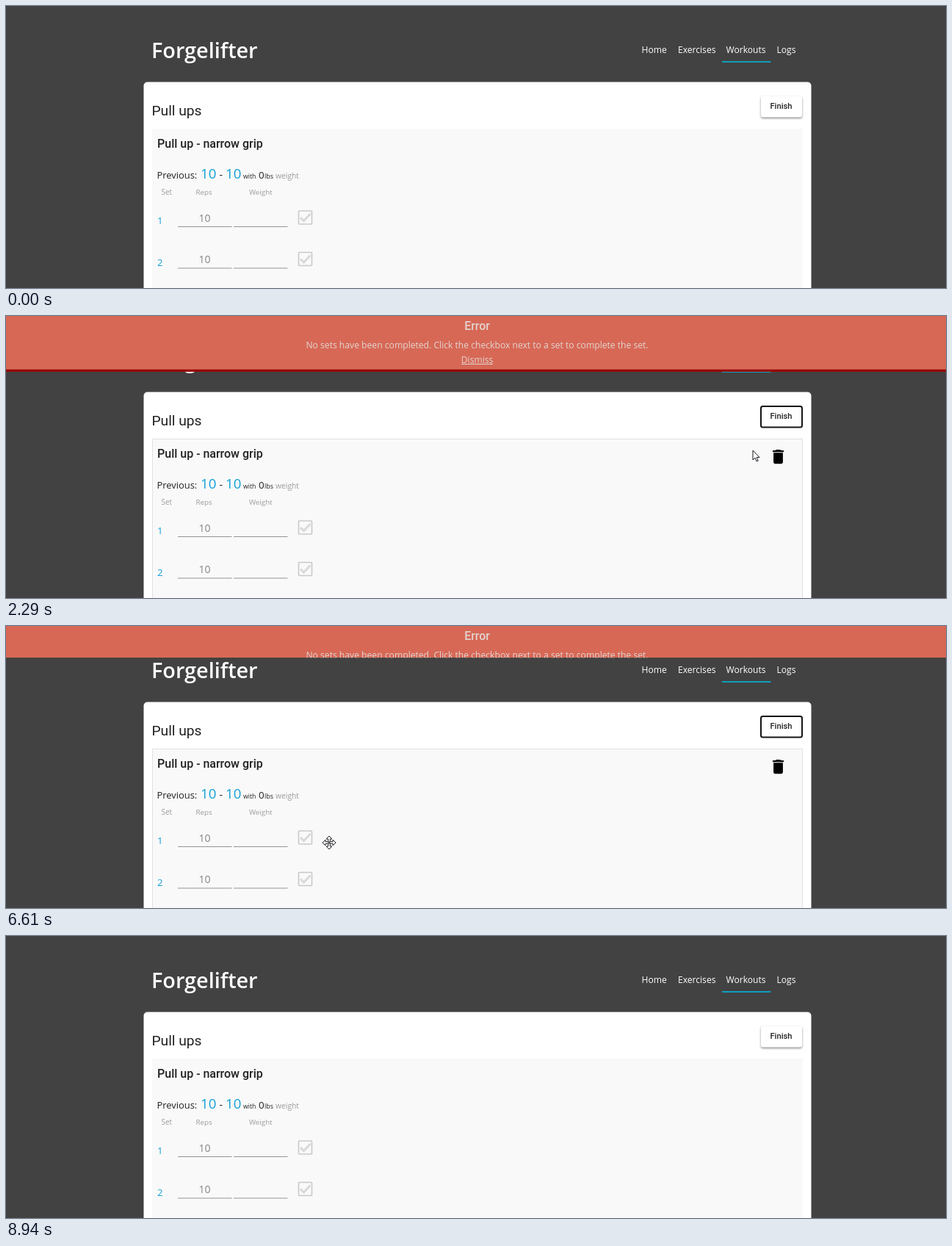
Animation, 1280 px wide and 384 px high, one loop 9.02 s. Source, as an HTML page with a canvas:

```html
<!DOCTYPE html>
<html lang="en">
<head>
<meta charset="utf-8">
<title>Workout log</title>
<style>
  html, body { margin: 0; width: 100%; height: 100%; overflow: hidden; background: #424242; }
  canvas { display: block; }
</style>
</head>
<body>
<canvas id="stage" width="1280" height="384"></canvas>
<script>
const ctx = document.getElementById('stage').getContext('2d');
const LOOP = 9020;
const SANS = '"Open Sans", "Noto Sans", sans-serif';
const ROBOTO = 'Roboto, sans-serif';
const BLUE = '#139fd7', GRAY = '#9b9b9b', INK = '#212121';

// Pointer visits: each list holds [time, x, y] points; it is hidden between lists.
const VISITS = [
  [[70, 1176, 236], [240, 1072, 212], [400, 1064, 160], [540, 1064, 131],
   [700, 1063, 148], [940, 1063, 147], [1100, 1063, 143.5], [1500, 1063, 143.5],
   [1740, 1066, 168], [1900, 1066, 176], [2130, 1032, 182], [2290, 1017, 183],
   [2520, 1014, 183], [2760, 998, 183], [3800, 998, 183], [3850, 996, 186],
   [4010, 950, 205], [4250, 520, 325], [4400, 381, 382], [4460, 381, 400]],
  [[4560, 373, 380], [4800, 392, 330], [5040, 412, 293], [5350, 413, 293],
   [5600, 436, 295], [5750, 440, 295], [7220, 440, 295], [7460, 860, 260],
   [7620, 1080, 230], [7700, 1205, 205], [7780, 1206, 205]]
];

const DELETE_ICON = new Path2D('M6 19c0 1.1.9 2 2 2h8c1.1 0 2-.9 2-2V7H6v12zM19 4h-3.5l-1-1h-5l-1 1H5v2h14V4z');
const ARROW = new Path2D('M0 0V13L3 10.2L5.2 15L7.2 14.1L5.1 9.5H9Z');
const HAND = new Path2D('M-1.4 1.2Q0-1 1.4 1.2V6Q3 4.8 4 6.4Q5.6 5.6 6.3 7.2Q8.2 6.8 8.2 9V12Q7.6 14.5 6.4 17.5H-.6Q-2 14-4.8 10.8Q-5.4 8.4-3.2 9L-1.4 10.6Z');

function ease(u) {
  if (u <= 0) return 0;
  if (u >= 1) return 1;
  const bezier = (s, a, b) => 3 * s * (1 - s) ** 2 * a + 3 * s * s * (1 - s) * b + s ** 3;
  let low = 0, high = 1;
  for (let i = 0; i < 24; i++) {
    const mid = (low + high) / 2;
    if (bezier(mid, .25, .25) < u) low = mid; else high = mid;
  }
  return bezier(low, .1, 1);
}

function text(str, x, y, size, color, { font = SANS, weight = 400, align = 'left' } = {}) {
  ctx.font = `${weight} ${size}px ${font}`;
  ctx.textAlign = align;
  ctx.fillStyle = color;
  ctx.fillText(str, x, y);
}

function rect(x, y, w, h, color) {
  ctx.fillStyle = color;
  ctx.fillRect(x, y, w, h);
}

function roundRect(x, y, w, h, r) {
  ctx.beginPath();
  ctx.roundRect(x, y, w, h, r);
}

function polyline(points, color, width) {
  ctx.beginPath();
  points.forEach(([x, y]) => ctx.lineTo(x, y));
  ctx.strokeStyle = color;
  ctx.lineWidth = width;
  ctx.stroke();
}

function pointerAt(t) {
  const visit = VISITS.find(v => t >= v[0][0] && t < v[v.length - 1][0]);
  if (!visit) return null;
  const i = visit.findIndex(p => p[0] > t);
  const [t0, x0, y0] = visit[i - 1], [t1, x1, y1] = visit[i];
  const k = (t - t0) / (t1 - t0);
  return { x: x0 + (x1 - x0) * k, y: y0 + (y1 - y0) * k };
}

const inside = (p, x, y, w, h) => p && p.x >= x && p.x < x + w && p.y >= y && p.y < y + h;

function drawHeader() {
  text('Forgelifter', 198, 71, 28.8, '#fff', { weight: 600 });
  [['Home', 865.5], ['Exercises', 915], ['Workouts', 980.5], ['Logs', 1049.5]]
    .forEach(([label, x]) => text(label, x, 64, 12.1, '#fff'));
  rect(975, 75, 66.5, 2, '#0f9fbd');
}

function drawButton(t) {
  const focused = t >= 1260 && t < 8940;
  ctx.save();
  if (!focused) {
    ctx.shadowColor = 'rgba(0,0,0,.45)';
    ctx.shadowBlur = 3;
    ctx.shadowOffsetY = 1.4;
  }
  roundRect(1028, 122.5, 56, 29, 3);
  ctx.fillStyle = '#fff';
  ctx.fill();
  ctx.restore();
  if (focused) {
    const age = t - 1260;
    const fade = Math.max(0, Math.min(1, (1900 - t) / 400));
    ctx.save();
    ctx.clip();
    ctx.globalAlpha = fade;
    rect(1028, 122, 57, 30, '#efefef');
    ctx.beginPath();
    ctx.arc(1063, 146, Math.min(45, age * .21), 0, 7);
    ctx.fillStyle = '#dfdfdf';
    ctx.fill();
    ctx.restore();
    roundRect(1028, 123, 56, 28.5, 2.5);
    ctx.strokeStyle = '#151515';
    ctx.lineWidth = 2;
    ctx.stroke();
  }
  text('Finish', 1055.5, 140, 11.2, INK, { font: ROBOTO, weight: 500, align: 'center' });
}

function drawSet(number, y) {
  text(number, 206, y + 9, 13.2, BLUE);
  text('10', 270.5, y + 5.5, 14, '#858585', { align: 'center' });
  rect(234, y + 12, 73.5, 1, '#949494');
  rect(310, y + 12, 73.5, 1, '#949494');
  ctx.strokeStyle = '#c9c9c9';
  ctx.lineWidth = 1.6;
  roundRect(398.5, y - 9, 18, 18, 1);
  ctx.stroke();
  polyline([[401, y], [405.5, y + 4.5], [414.5, y - 5]], '#d9d9d9', 3);
}

function drawPanel(hovered) {
  rect(199, 167, 886, 217, '#f9f9f9');
  if (hovered) {
    ctx.strokeStyle = '#e1e1e1';
    ctx.lineWidth = 1;
    ctx.strokeRect(199.5, 167.5, 885, 230);
    ctx.save();
    ctx.translate(1038.7, 178.8);
    ctx.scale(1.067, 1.067);
    ctx.fillStyle = '#000';
    ctx.fill(DELETE_ICON);
    ctx.restore();
  }
  text('Pull up - narrow grip', 206, 193, 16, INK, { font: ROBOTO, weight: 500 });
  text('Previous:', 205.5, 235, 12.9, INK);
  text('10', 265, 235, 18.6, BLUE);
  text('-', 290.5, 235, 14, INK);
  text('10', 299, 235, 18.6, BLUE);
  text('with', 323, 235, 8.7, INK);
  text('0', 344, 235, 13.4, INK);
  text('lbs', 352, 235, 9, INK);
  text('weight', 367, 235, 10.3, GRAY);
  text('Set', 211.5, 257, 9.9, GRAY);
  text('Reps', 258.5, 257, 9.8, GRAY);
  text('Weight', 331, 257, 9.8, GRAY);
  drawSet('1', 288);
  drawSet('2', 344.5);
}

function drawBanner(t) {
  const leaving = t >= 6350;
  const open = leaving ? 1 - ease((t - 6350) / 1000) : ease((t - 1325) / 1000);
  const height = 76 * open;
  if (height < .2) return;
  ctx.save();
  ctx.beginPath();
  ctx.rect(0, 0, 1280, height);
  ctx.clip();
  rect(0, 0, 1280, height, '#d76856');
  const pale = '#e2d5d1';
  text('Error', 641.5, 18.5, 16, pale, { font: ROBOTO, weight: 500, align: 'center' });
  text('No sets have been completed. Click the checkbox next to a set to complete the set.',
    641.5, 44, 12.15, pale, { align: 'center' });
  text('Dismiss', 641.5, 64, 12.1, pale, { align: 'center' });
  rect(620, 65, 43, 1, pale);
  if (!leaving) rect(0, height - 3.2, 1280, 3.2, '#960804');
  ctx.restore();
}

function drawMoveCursor() {
  for (let i = 0; i < 4; i++) {
    ctx.rotate(Math.PI / 2);
    const arm = new Path2D('M-1.3-1.3V-5H-3.8L0-9L3.8-5H1.3V-1.3');
    ctx.fill(arm);
    ctx.stroke(arm);
  }
  ctx.fillRect(-1.3, -1.3, 2.6, 2.6);
  ctx.strokeRect(-1, -1, 2, 2);
}

function drawPointer(p, hovered) {
  const onCheckbox = inside(p, 398, 278, 19, 19);
  const onButton = inside(p, 1028, 122, 56, 30);
  ctx.save();
  ctx.translate(p.x, p.y);
  ctx.fillStyle = '#fff';
  ctx.strokeStyle = '#1b1b22';
  ctx.lineWidth = 1;
  ctx.lineJoin = 'round';
  if (hovered && p.y > 265 && !onCheckbox) {
    drawMoveCursor();
  } else {
    const shape = onCheckbox || onButton ? HAND : ARROW;
    ctx.fill(shape);
    ctx.stroke(shape);
    if (shape === HAND) {
      polyline([[1.4, 6], [1.4, 8.5]], '#1b1b22', .9);
      polyline([[4, 6.4], [4, 8.8]], '#1b1b22', .9);
      polyline([[6.3, 7.2], [6.3, 9.2]], '#1b1b22', .9);
    }
  }
  ctx.restore();
}

function draw(t) {
  const pointer = pointerAt(t);
  const offscreen = t >= 4400 && t < 4560;
  const hovered = offscreen || inside(pointer, 199, 167, 886, 240);
  rect(0, 0, 1280, 384, '#424242');
  drawHeader();
  roundRect(187.5, 103.5, 909, 300, 5);
  ctx.fillStyle = '#fff';
  ctx.fill();
  text('Pull ups', 198.5, 148.5, 19.2, INK, { font: ROBOTO });
  drawPanel(hovered);
  drawButton(t);
  drawBanner(t);
  if (pointer) drawPointer(pointer, hovered);
}

const start = performance.now();
function tick() {
  draw((performance.now() - start) % LOOP);
  requestAnimationFrame(tick);
}
tick();
</script>
</body>
</html>
```
